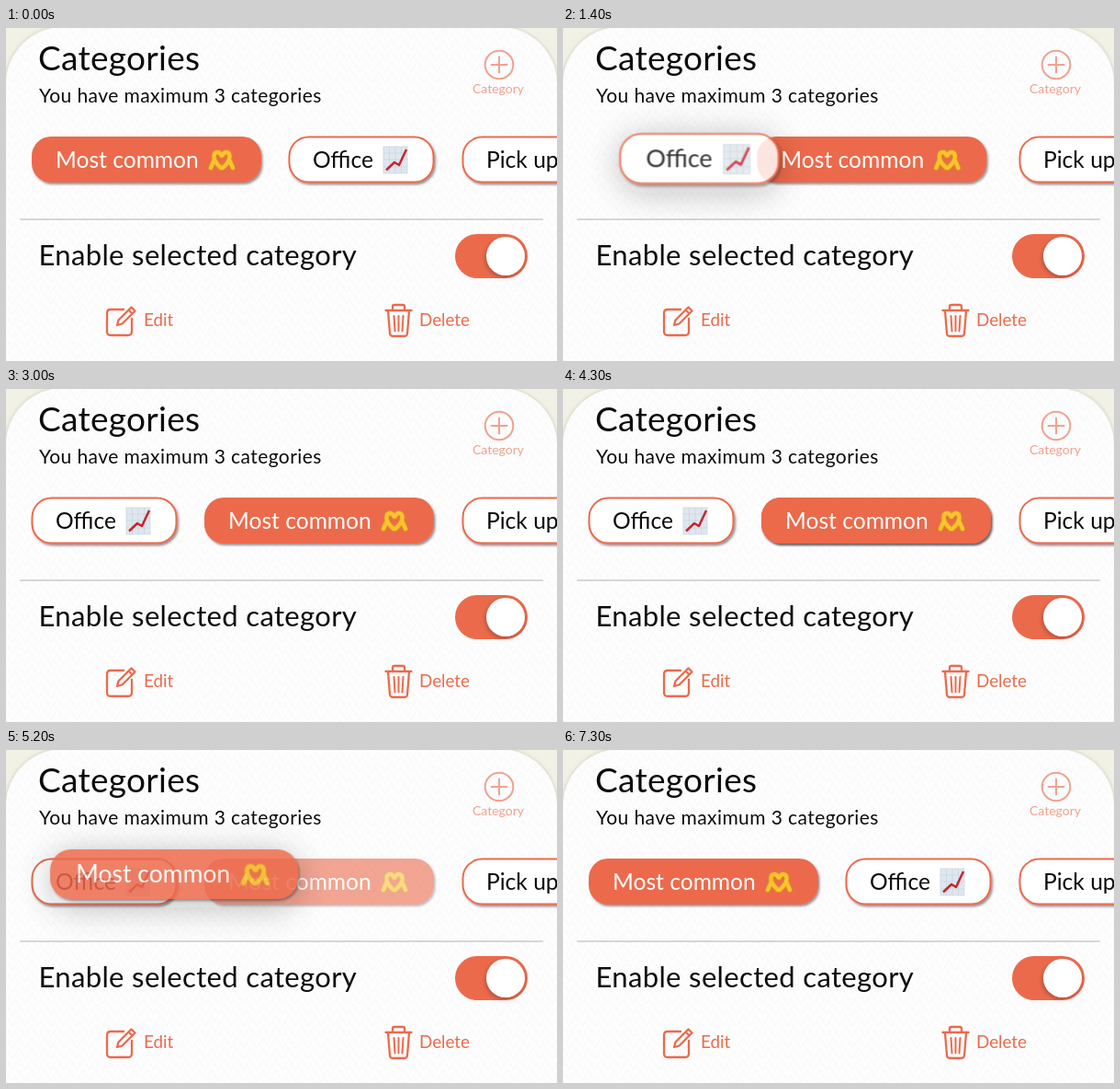
An HTML page for the animation above (7400 ms loop, 600x362 px).

```html
<!DOCTYPE html>
<html lang="en">
<head>
<meta charset="utf-8">
<title>Categories</title>
<style>
  html, body { margin: 0; width: 100%; height: 100%; overflow: hidden; background: #f2f1e5; }
  svg { display: block; width: 600px; height: 362px; }
  text { font-family: Lato, "Open Sans", sans-serif; fill: #0c0c0c; }
  .label { font-size: 24.6px; }
  .action { font-size: 18.8px; fill: #ec6a4c; }
  .icon { fill: none; stroke: #ec6a4c; stroke-width: 2.3; stroke-linecap: round; stroke-linejoin: round; }
  .outlined { fill: #fff; stroke: #ec6a4c; stroke-width: 2; }

  /* The clock below moves --t in 100 ms ticks. */
  .anim { animation: 7400ms linear infinite paused; animation-delay: calc(var(--t, 0) * -1ms); }
  #mostSlot { animation-name: most-slot; }
  #officeSlot { animation-name: office-slot; }
  #officeDrag { animation-name: office-drag; }
  #mostDrag { animation-name: most-drag; }
  #officeDrag .glow { animation-name: office-glow; }
  #mostDrag .glow { animation-name: most-glow; }

  @keyframes most-slot {
    0% { transform: translate(153px, 143px); opacity: 1; }
    13.514% { transform: translate(153px, 143px); animation-timing-function: cubic-bezier(.4, 0, .2, 1); }
    20.27% { transform: translate(341px, 143px); }
    67.568% { opacity: 1; }
    70.27% { opacity: .6; }
    74.324% { transform: translate(341px, 143px); opacity: 0; animation-timing-function: step-end; }
    93.243% { transform: translate(153px, 143px); opacity: 1; }
    100% { transform: translate(153px, 143px); opacity: 1; }
  }
  @keyframes office-slot {
    0% { transform: translate(387px, 143px); opacity: 1; }
    10.811% { opacity: 1; }
    16.216% { transform: translate(387px, 143px); opacity: 0; animation-timing-function: step-end; }
    33.784% { transform: translate(107px, 143px); opacity: 1; }
    72.973% { transform: translate(107px, 143px); animation-timing-function: cubic-bezier(.4, 0, .2, 1); }
    79.73%, 100% { transform: translate(387px, 143px); opacity: 1; }
  }
  @keyframes office-drag {
    0% { transform: translate(387px, 143px); opacity: 0; animation-timing-function: step-end; }
    1.351% { transform: translate(387px, 143px); opacity: 1; animation-timing-function: ease-out; }
    8.108% { transform: translate(384.5px, 142px) scale(1.09); opacity: .83; animation-timing-function: ease-in; }
    13.514% { transform: translate(229px, 138px) scale(1.1); opacity: .83; animation-timing-function: ease-out; }
    18.919%, 24.324% { transform: translate(148.5px, 142px) scale(1.1); opacity: .83; animation-timing-function: ease-in-out; }
    32.432% { transform: translate(107px, 143px); opacity: 1; animation-timing-function: step-end; }
    33.784%, 100% { transform: translate(107px, 143px); opacity: 0; }
  }
  @keyframes most-drag {
    0% { transform: translate(341px, 143px); opacity: 0; animation-timing-function: step-end; }
    58.108% { transform: translate(341px, 143px); opacity: 1; animation-timing-function: ease-out; }
    64.865% { transform: translate(338.5px, 142px) scale(1.07); opacity: .85; animation-timing-function: ease-in; }
    70.27% { transform: translate(183px, 135px) scale(1.08); opacity: .85; animation-timing-function: ease-out; }
    78.378%, 83.784% { transform: translate(96px, 140.5px) scale(1.08); opacity: .85; animation-timing-function: ease-in-out; }
    91.892% { transform: translate(153px, 143px); opacity: 1; animation-timing-function: step-end; }
    93.243%, 100% { transform: translate(153px, 143px); opacity: 0; }
  }
  @keyframes office-glow {
    0%, 1.351% { opacity: 0; }
    8.108%, 24.324% { opacity: 1; }
    32.432%, 100% { opacity: 0; }
  }
  @keyframes most-glow {
    0%, 58.108% { opacity: 0; }
    64.865%, 83.784% { opacity: 1; }
    91.892%, 100% { opacity: 0; }
  }
</style>
</head>
<body>
<svg viewBox="0 0 600 362">
  <defs>
    <filter id="edge" x="-10%" y="-20%" width="120%" height="150%">
      <feDropShadow dx="1.5" dy="2" stdDeviation="1" flood-color="#2a2630" flood-opacity=".5"/>
    </filter>
    <filter id="soft" x="-60%" y="-200%" width="220%" height="500%">
      <feGaussianBlur stdDeviation="17"/>
    </filter>
    <filter id="knob" x="-30%" y="-30%" width="160%" height="160%">
      <feDropShadow dx="-1" dy="2" stdDeviation="2.5" flood-opacity=".28"/>
    </filter>
    <filter id="rim" x="-5%" y="-5%" width="110%" height="110%">
      <feDropShadow dx="0" dy="0" stdDeviation="2" flood-opacity=".2"/>
    </filter>
    <pattern id="grain" width="14" height="12" patternUnits="userSpaceOnUse">
      <path d="M0 0L7 12L14 0M0 6H5M9 8L13 11" fill="none" stroke="#000" stroke-opacity=".014"/>
    </pattern>

    <path id="hand" d="M-1 9C-4 6-8.5 3-8.5-3C-8.5-9-3-9.5-.5-4.5M-8.5 1L-12 9"/>
    <g id="hands" fill="none" stroke-linecap="round" stroke-linejoin="round">
      <g stroke="#d9951d" stroke-width="6">
        <use href="#hand"/><use href="#hand" transform="scale(-1 1)"/>
      </g>
      <g stroke="#fac22f" stroke-width="4.2">
        <use href="#hand"/><use href="#hand" transform="scale(-1 1)"/>
      </g>
    </g>
    <g id="chart">
      <rect x="24" y="-14" width="26" height="29" fill="#dfe7ee" stroke="#cbd6df" stroke-width=".8"/>
      <path d="M30.5-14V15M37-14V15M43.5-14V15M24-7H50M24 0H50M24 8H50" stroke="#c6d3de" stroke-width=".7"/>
      <path d="M27 11.5L36 3L41 6L49-11" fill="none" stroke="#c8242c" stroke-width="2.5" stroke-linejoin="round"/>
    </g>

    <g id="most">
      <rect x="-125" y="-25" width="250" height="50" rx="21" fill="#ec6a4c" filter="url(#edge)"/>
      <text class="label" x="-99" y="8.5" style="fill:#fff">Most common</text>
      <use href="#hands" x="82"/>
    </g>
    <g id="office">
      <rect class="outlined" x="-78.5" y="-24.5" width="157" height="49" rx="21" filter="url(#edge)"/>
      <text class="label" x="-53" y="8.5">Office</text>
      <use href="#chart"/>
    </g>
  </defs>

  <rect width="600" height="362" fill="#f2f1e5"/>
  <rect y="-1" width="600" height="440" rx="62" fill="#fdfdfd" filter="url(#rim)"/>
  <rect y="-1" width="600" height="440" rx="62" fill="url(#grain)"/>

  <text x="35" y="45.5" font-size="37" letter-spacing=".3">Categories</text>
  <text x="36" y="80.5" font-size="21" letter-spacing=".42">You have maximum 3 categories</text>

  <g opacity=".62">
    <g class="icon" style="stroke-width:2">
      <circle cx="537" cy="40" r="15.3"/>
      <path d="M537 31.5V48.5M528.5 40H545.5"/>
    </g>
    <text x="508" y="71" font-size="14" style="fill:#ec6a4c">Category</text>
  </g>

  <rect x="15" y="207" width="570" height="2" rx="1" fill="#d6d6d9"/>
  <text x="35.5" y="258" font-size="31" letter-spacing=".35">Enable selected category</text>
  <rect x="489" y="224" width="79" height="48" rx="24" fill="#ec6a4c"/>
  <circle cx="544" cy="248" r="21" fill="#fff" filter="url(#knob)"/>

  <g class="icon">
    <path d="M128 306H114Q110 306 110 310V330Q110 334 114 334H133Q137 334 137 330V316"/>
    <path d="M121 323L122.5 317.5L136.5 303.5L140.5 307.5L126.5 321.5ZM133.5 306.5L137.5 310.5"/>
    <path d="M413.5 307H441.5M421 306.5V303Q421 301 423 301H432Q434 301 434 303V306.5"/>
    <path d="M416 307.5L418 332Q418.3 335 421 335H434Q436.700 335 437 332L439 307.5"/>
    <path d="M422.500 313L423.500 329.500M427.500 313V329.500M432.500 313L431.500 329.500" style="stroke-width:2"/>
  </g>
  <text class="action" x="150" y="323.5">Edit</text>
  <text class="action" x="450" y="323.5">Delete</text>

  <rect class="outlined" x="497.500" y="118.500" width="200" height="49" rx="21" filter="url(#edge)"/>
  <text class="label" x="523" y="151.500">Pick up</text>

  <g id="officeSlot" class="anim"><use href="#office"/></g>
  <g id="mostSlot" class="anim"><use href="#most"/></g>

  <g id="officeDrag" class="anim">
    <rect class="anim glow" x="-79" y="-22" width="158" height="56" rx="22" fill="#1c1420" fill-opacity=".3" filter="url(#soft)"/>
    <use href="#office"/>
  </g>
  <g id="mostDrag" class="anim">
    <rect class="anim glow" x="-125" y="-22" width="250" height="56" rx="22" fill="#1c1420" fill-opacity=".3" filter="url(#soft)"/>
    <use href="#most"/>
  </g>
</svg>
<script>
  const LOOP = 7400, TICK = 100;
  const start = performance.now();
  function tick() {
    const t = (performance.now() - start) % LOOP;
    document.documentElement.style.setProperty("--t", Math.floor(t / TICK) * TICK);
    requestAnimationFrame(tick);
  }
  tick();
</script>
</body>
</html>
```
